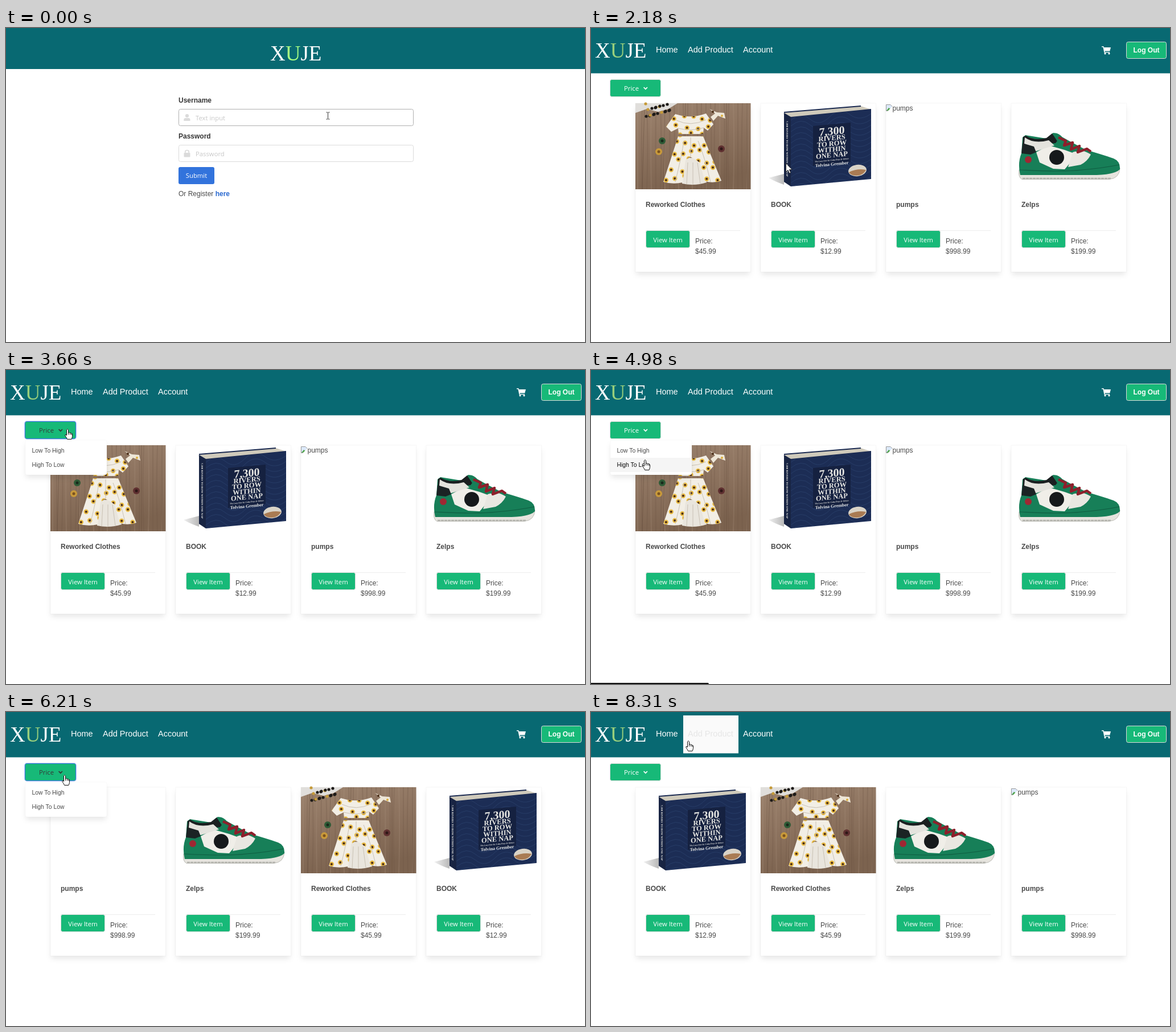
Write an HTML page that moves like this. It is 1017 px wide and 551 px high and loops after 8390 ms.

```html
<!DOCTYPE html>
<html lang="en">
<head>
<meta charset="utf-8">
<title>Shop</title>
<style>
  html, body { margin: 0; width: 100%; height: 100%; overflow: hidden; background: #fff; }
  svg { display: block; width: 100vw; height: 100vh; }
  text { font: 12px "Liberation Sans", Arial, sans-serif; fill: #4a4a4a; white-space: pre; }
  .bold { font-weight: bold; }
  .label { font-weight: bold; fill: #363636; }
  .ui { font: 11.3px "Open Sans", "Noto Sans", sans-serif; }
  .nav { font-size: 14.5px; }
  .small { font-size: 10.4px; }
  .brand { font: 37px "Liberation Serif", "Times New Roman", serif; fill: #fff; }
  .cover { font: bold 12.5px "Liberation Serif", serif; fill: #e6e6e2; text-anchor: middle; }
  .mid { text-anchor: middle; }
  .white { fill: #fff; }
  .pale { fill: #c8c8c8; }
  .shadow { fill: rgba(10,10,10,.1); filter: blur(5px); }
</style>
</head>
<body>
<svg id="stage" viewBox="0 0 1017 551">
  <defs>
    <linearGradient id="wood" x2=".3" y2="1">
      <stop stop-color="#9c836e"/><stop offset=".5" stop-color="#8d735f"/><stop offset="1" stop-color="#7c634f"/>
    </linearGradient>
    <linearGradient id="floor"><stop stop-color="#f0f0f0"/><stop offset="1" stop-color="#b9b9b9"/></linearGradient>
    <clipPath id="dress">
      <path d="M70 19Q97 28 124 18L137 37L127 48L120 43L119 54H76L75 44L63 50L54 41Z"/>
      <path d="M75 58H119Q130 85 151 136Q137 141 122 137L113 104L104 98L96 94L88 100L83 139Q66 143 49 138Q63 96 75 58Z"/>
    </clipPath>
    <clipPath id="front"><path d="M53 25L194 11V133L53 146Z"/></clipPath>
    <g id="clothes"></g>
    <g id="book"></g>
    <g id="shoe">
      <path d="M14 117Q12 130 19 133.5H172Q190 132 191 114Z" fill="#e6e4de" stroke="#bdbdb7"/>
      <path d="M20 132H176" stroke="#b5b5af" stroke-width="2.5" stroke-dasharray="5 1"/>
      <path d="M20 60L25 56L62 62L74 52L84 56L125 80Q160 90 180 97Q192 102 191 116Q182 125 150 126H16Q11 105 18 88Z" fill="#177f58"/>
      <path d="M44 86L66 74L94 82L116 90L104 104L94 116L74 115L50 104Z" fill="#f0eee8"/>
      <path d="M108 86L122 82Q134 86 140 90Q134 102 122 108L100 112Z" fill="#e9e7e1"/>
      <path d="M21 59L26 57Q40 66 62 61L72 53L84 62L78 70Q48 72 20 80Z" fill="#1a1f20"/>
      <path d="M24 60Q40 72 66 65L76 74L44 84L22 82Z" fill="#e4e3dd"/>
      <path d="M20 70L40 76L44 86L34 90L18 88Z" fill="#1b2324"/>
      <path d="M72 53Q82 50 90 60L128 80L118 87L82 68Z" fill="#177f58"/>
      <path d="M83 60L96 66L93 74L108 69L105 81L120 75L117 86L133 80L140 85" fill="none" stroke="#8d1f2b" stroke-width="4.5" stroke-linejoin="round"/>
      <path d="M15 117Q90 121 124 117Q160 114 190 108" fill="none" stroke="#0f5d41" stroke-width="1.2"/>
      <circle cx="80" cy="95" r="13" fill="#16191b"/>
      <circle cx="30" cy="99" r="6" fill="#a02733"/>
    </g>
    <g id="pumps"></g>
    <g id="broken">
      <path d="M.5 2.5H8L11.5 6V13.5H.5Z" fill="#dce9fb" stroke="#9a9a9a"/>
      <path d="M1 13L5 8L8 10L11 7V13Z" fill="#4fa34c"/>
      <path d="M3 14L12 5V14Z" fill="#fff"/>
      <text x="11.5" y="13">pumps</text>
    </g>
    <path id="arrow" d="M.5.5V15.5L4 12.3L6.4 18L8.8 17L6.4 11.5H11Z" fill="#fff" stroke="#222" stroke-width=".9"/>
    <path id="hand" d="M-1.5 2Q0-.8 1.5 2V7Q3.6 5.8 4.4 7.4Q6.2 6.6 6.9 8.4Q8.5 8.2 8.5 10V13.5Q8.2 16 7 18.5H-.4Q-1.6 15.5-4 12.4Q-4.4 9.8-2.8 10.4L-1.5 12Z M1.5 7V10.5M4.4 7.5V10.5M6.9 8.4V11" fill="#fff" stroke="#111"/>
    <path id="beam" d="M-3-6H-.8L0-5.3L.8-6H3M0-5.3V5.3M-3 6H-.8L0 5.3L.8 6H3" fill="none" stroke="#333"/>
  </defs>
  <g id="scene"></g>
</svg>
<script>
const LOOP = 8390, TEAL = '#086972', GREEN = '#17b978';
const el = id => document.getElementById(id);
const text = (x, y, s, cls = '', extra = '') => `<text x="${x}" y="${y}" class="${cls}" ${extra}>${s}</text>`;
const rect = (x, y, w, h, fill, extra = '') => `<rect x="${x}" y="${y}" width="${w}" height="${h}" fill="${fill}" ${extra}/>`;
const path = (d, fill, extra = '') => `<path d="${d}" fill="${fill}" ${extra}/>`;
const dot = (x, y, r, fill) => `<circle cx="${x}" cy="${y}" r="${r}" fill="${fill}"/>`;
const use = (id, x, y) => `<use href="#${id}" x="${x}" y="${y}"/>`;
const range = n => [...Array(n).keys()];
const within = (t, spans) => spans.some(([a, b]) => t >= a && t < b);

function drawClothes() {
  const planks = range(6).map(i => path(`M${16 + i * 36} 0L${12 + i * 37} 151`, 'none', 'stroke="#604a3a" stroke-opacity=".5"')).join('');
  const grain = range(25).map(i => path(`M${i * 8 + 4} 0q${3 * Math.sin(i * 4)} 75 0 151`, 'none',
    `stroke="${i % 3 ? '#6d5543' : '#ac947f'}" stroke-opacity=".25" stroke-width="2"`)).join('');
  const blossoms = range(56).map(i => {
    const row = Math.floor(i / 7), x = 48 + (i % 7) * 17 + (row % 2) * 8 + 4 * Math.sin(i * 7), y = 26 + row * 15 + 4 * Math.cos(i * 5);
    return dot(x, y, 4.2, '#e9bc45') + dot(x, y, 2, '#4d2d14');
  }).join('');
  const petals = range(20).map(i =>
    dot(18 + (i * 17) % 44, 1 + (i * 7) % 23, 2.6, i % 4 ? '#1d1a18' : '#c59a38')).join('');
  return rect(0, 0, 202.5, 151, 'url(#wood)') + grain + planks +
    path('M0 0H74L58 10L40 15L20 10L0 17Z', '#e0dedb') + petals +
    path('M84 96H116L125 139Q104 146 82 141Z', '#e9e5dd') +
    `<g clip-path="url(#dress)">${rect(0, 0, 202, 151, '#f2eee5')}${blossoms}</g>` +
    path('M72 30Q97 42 124 29M75 44Q98 50 120 43M97 60V94M85 66Q82 90 70 138M110 66Q122 95 132 138M92 104L90 142M101 104V143M109 104L114 141', 'none', 'stroke="#c9c1b4"') +
    path('M130 10L143 16L156 17L158 27L145 22L137 31L132 24L140 18Z', '#eee7d8') +
    dot(136, 15, 2, '#4a2d17') + dot(152, 22, 2, '#dcae3c') +
    dot(47, 66, 6, '#2f5b36') + dot(47, 66, 2.5, '#182a1b') +
    dot(41, 85, 6, '#c99a3a') + dot(41, 85, 2.5, '#7b5320') +
    dot(151, 80, 6, '#5f3030') + dot(151, 80, 2.5, '#2f1717');
}

function drawBook() {
  const swirls = range(13).map(i => {
    const y = 22 + i * 10;
    return path(`M53 ${y + 8}q18 -16 34 -2t34 -4t36 -4t40 -4`, 'none', 'stroke="#3c5a86" stroke-opacity=".35"');
  }).join('');
  const lines = ['RIVERS', 'TO ROW', 'WITHIN', 'ONE NAP'];
  return path('M14 131L41 124V143Q24 137 14 131Z', 'url(#floor)') +
    path('M41 17L176 5L194 11L53 25Z', '#cfcabb') +
    path('M41 16L176 5M41 18L53 25L194 11', 'none', 'stroke="#1b2a50" stroke-width="2"') +
    path('M41 17L53 25V146L41 138Z', '#182443') +
    path('M53 25L194 11V133L53 146Z', '#1c2d55') +
    `<g clip-path="url(#front)">${swirls}</g>` +
    path('M92 40L158 34V103L92 110Z', '#152140') +
    text(0, 0, '7,300 RIVERS TO ROW WITHIN ONE NAP', 'cover', 'transform="translate(45 80) rotate(90)" style="font-size:5px"') +
    '<g transform="translate(125 0) skewY(-5.4)">' +
    text(0, 55.5, '7,300', 'cover', 'style="font-size:20px"') +
    lines.map((s, i) => text(0, 65 + i * 10, s, 'cover')).join('') +
    text(0, 101, 'The Lazy Oar for Calm Days &amp; Others', 'cover', 'style="font-size:3.6px"') +
    text(0, 109.5, 'Tolvina Grember', 'cover', 'style="font-size:8px"') + '</g>' +
    '<ellipse cx="170" cy="118" rx="16" ry="10" fill="#d9d3c7" transform="rotate(-8 170 118)"/>' +
    path('M155 121Q170 114 185 117Q180 127 168 127Q158 127 155 121Z', '#a97b53');
}

const products = [
  ['clothes', 'Reworked Clothes', '$45.99'],
  ['book', 'BOOK', '$12.99'],
  ['pumps', 'pumps', '$998.99'],
  ['shoe', 'Zelps', '$199.99'],
];

const brand = (x, y, accent) => text(x, y, `X<tspan fill="${accent}">U</tspan>JE`, 'brand');
const button = (x, y, w, h, border = '#dbdbdb') => rect(x + .5, y + .5, w - 1, h - 1, GREEN, `rx="3" stroke="${border}"`);

function card([art, name, price], i, altShown) {
  return `<g transform="translate(${78 + i * 220} 0)">` +
    rect(1.5, 139.5, 199, 293, '', 'class="shadow"') +
    rect(0, 132, 202.5, 296, '#fff', 'stroke="#0a0a0a" stroke-opacity=".03"') +
    use(art, 0, 132) + (art === 'pumps' && altShown ? use('broken', 0, 132) : '') +
    text(18, 314, name, 'bold') + rect(18, 355, 166, 1, '#ededed') +
    button(18, 355, 78, 31) + text(57, 375.5, 'View Item', 'ui mid white') +
    text(105, 378, 'Price:') + text(105, 396, price) + '</g>';
}

function login(x, y) {
  const inside = top => y >= top && y <= top + 30;
  const input = (top, hint) => rect(303.5, top + .5, 412, 29, '#fff', `rx="3" stroke="${inside(top) ? '#b0b0b0' : '#dbdbdb'}"`) +
    text(333, top + 19.5, hint, 'ui pale');
  const cursor = inside(142) || inside(205) ? 'beam' : inside(244) ? 'hand' : 'arrow';
  return rect(0, 0, 1017, 72, TEAL) + brand(464, 57, '#a7ff83') +
    text(303, 131, 'Username', 'label') + input(142, 'Text input') +
    dot(318, 154, 3.1, '#dbdbdb') + path('M312.3 163V161Q312.3 158 315.5 158H320.5Q323.5 158 323.5 161V163Z', '#dbdbdb') +
    text(303, 193.5, 'Password', 'label') + input(205, 'Password') +
    rect(312.5, 219, 11, 7.5, '#dbdbdb', 'rx="1"') + path('M314.8 219V217Q315 214.5 318 214.5T321.2 217V219', 'none', 'stroke="#dbdbdb" stroke-width="1.7"') +
    rect(303, 244, 63, 30, inside(244) ? '#276cda' : '#3273dc', 'rx="3"') + text(334.5, 263, 'Submit', 'ui mid white') +
    text(303, 295, 'Or Register <tspan class="bold" fill="#2a69d0">here</tspan>') + use(cursor, x, y);
}

function menu(y) {
  const item = (top, label) => {
    const over = y >= top && y < top + 25;
    return (over ? rect(34, top, 143, 25, '#f5f5f5') : '') +
      text(45.5, top + 16, label, 'small', over ? 'style="fill:#0a0a0a"' : '');
  };
  return rect(35.5, 130.5, 140, 58, '', 'class="shadow"') +
    rect(34, 123, 143, 61, '#fff', 'rx="3" stroke="#0a0a0a" stroke-opacity=".02"') +
    item(129, 'Low To High') + item(154, 'High To Low');
}

function header(navHover) {
  return rect(0, 0, 1017, 79.5, TEAL) + brand(7, 52, '#98cf7c') +
    (navHover ? rect(162, 6, 97, 66.5, '#fafafa') : '') +
    text(114, 43, 'Home', 'nav white') +
    text(170, 43, 'Add Product', 'nav', `style="fill:${navHover ? '#e6e6e6' : '#fff'}"`) +
    text(267, 43, 'Account', 'nav white') +
    path('M897 32H900.3L901 34H913L911.3 40.5H902.4L902.7 42H911V43.3H901.4L899.4 33.5H897Z', '#fff') +
    dot(903, 44.8, 1.6, '#fff') + dot(910, 44.8, 1.6, '#fff') +
    button(940, 24, 71, 30) + text(975.5, 42.5, 'Log Out', 'bold mid white');
}

function priceButton(hover, focused) {
  const ink = hover || focused ? '#363636' : '#fff';
  return (focused ? rect(33, 90, 90, 31, 'none', 'rx="4" stroke="#3273dc" stroke-opacity=".3" stroke-width="2"') : '') +
    button(33, 90, 90, 31, focused ? '#3273dc' : '#dbdbdb') +
    text(58, 110, 'Price', 'ui', `style="fill:${ink}"`) +
    path('M92.6 104L95.8 107.2L99 104', 'none', `stroke="${ink}" stroke-width="1.7"`);
}

// Status bubble peeking in at the bottom edge: from, to, width.
const statusBars = [[1010, 1680, 341], [4200, 4900, 201], [4900, 5590, 207], [6590, 7300, 201]];

function shop(t, x, y) {
  const order = t < 5300 ? [0, 1, 2, 3] : t < 7080 ? [2, 3, 0, 1] : [1, 0, 3, 2];
  const altShown = within(t, [[1330, 5300], [5590, 7080], [7380, LOOP]]);
  const open = within(t, [[3430, 5300], [6050, 7080], [8160, 8235]]);
  const focused = within(t, [[3590, 4900], [6130, 6670]]);
  const overPrice = x >= 34 && x <= 122 && y >= 91 && y <= 120;
  const hand = within(t, [[3430, 5590], [6050, LOOP]]);
  const bar = statusBars.find(([a, b]) => t >= a && t < b);
  return header(t >= 8310) + order.map((p, i) => card(products[p], i, altShown)).join('') +
    priceButton(overPrice, focused) + (open ? menu(y) : '') +
    (bar ? rect(-4, 549, bar[2] + 4, 8, '#111', 'rx="2"') : '') +
    use(hand ? 'hand' : 'arrow', x, y);
}

// Pointer moves: first step, last step, step count, end x, end y.
const moves = [
  [70, 623, 8, 345, 268], [702, 860, 3, 341, 262],
  [2180, 2180, 1, 342, 237], [2260, 2640, 6, 263, 122],
  [2810, 3430, 9, 108, 103], [3890, 4050, 3, 104, 129],
  [4200, 4280, 2, 101, 137], [4590, 4900, 5, 95, 157],
  [5820, 6050, 4, 103, 110], [6360, 6440, 2, 99, 138],
  [8160, 8160, 1, 108, 108], [8235, 8310, 2, 171, 50],
];

function pointer(t) {
  let x = 565.5, y = 154;
  for (const [from, to, steps, endX, endY] of moves) {
    if (t < from) break;
    const done = t >= to ? 1 : (Math.floor((t - from) / (to - from) * (steps - 1)) + 1) / steps;
    x += (endX - x) * done;
    y += (endY - y) * done;
  }
  return [x, y];
}

el('clothes').innerHTML = drawClothes();
el('book').innerHTML = drawBook();

let shown = '';
function frame(now) {
  const t = now % LOOP;
  const [x, y] = pointer(t);
  const markup = t < 1010 ? login(x, y) : shop(t, x, y);
  if (markup !== shown) el('scene').innerHTML = shown = markup;
  requestAnimationFrame(frame);
}
frame(0);
</script>
</body>
</html>
```
